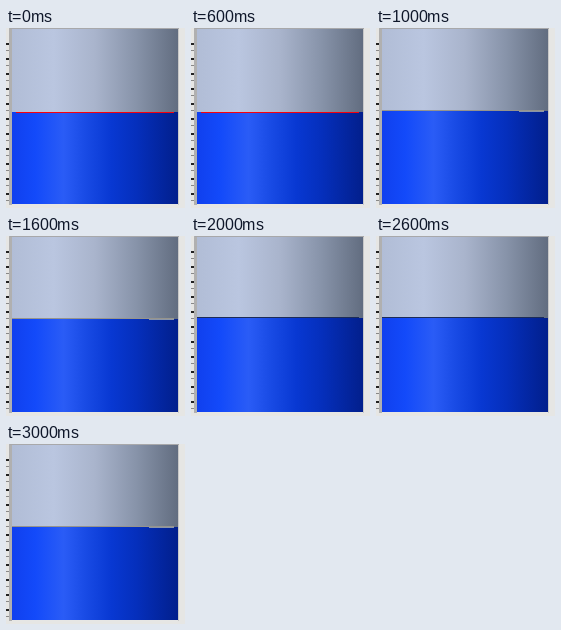
An HTML page for the animation above (4 s loop, 179 by 180 pixels).

```html
<!DOCTYPE html>
<html lang="en">
<head>
<meta charset="utf-8">
<title>Tank level</title>
<style>
  html, body { margin: 0; width: 100%; height: 100%; overflow: hidden; background: #e6e6e4; }
  svg { display: block; width: 100%; height: 100%; shape-rendering: crispEdges; }
</style>
</head>
<body>
<svg viewBox="0 0 179 180" preserveAspectRatio="none">
  <defs>
    <linearGradient id="gas">
      <stop offset="0" stop-color="#b1bdd6"/>
      <stop offset=".25" stop-color="#bac6e0"/>
      <stop offset=".5" stop-color="#a9b4cc"/>
      <stop offset=".75" stop-color="#8793a9"/>
      <stop offset="1" stop-color="#626d80"/>
    </linearGradient>
    <linearGradient id="liquid">
      <stop offset="0" stop-color="#1040ee"/>
      <stop offset=".14" stop-color="#134afa"/>
      <stop offset=".31" stop-color="#2a5cf6"/>
      <stop offset=".45" stop-color="#184ae4"/>
      <stop offset=".6" stop-color="#0838d2"/>
      <stop offset=".75" stop-color="#052fbc"/>
      <stop offset="1" stop-color="#021f8c"/>
    </linearGradient>
  </defs>
  <rect width="179" height="180" fill="#e6e6e4"/>
  <g id="scale"></g>
  <rect x="3" width="3" height="177" fill="#b0b0b0"/>
  <rect x="4" width="169" height="1" fill="#a8a8aa"/>
  <rect x="172" y="1" width="1" height="176" fill="#c8c8c8"/>
  <rect x="6" y="1" width="166" height="175" fill="url(#gas)"/>
  <rect id="fill" x="6" width="166" height="92" fill="url(#liquid)"/>
  <rect id="line" width="162" height="1"/>
  <rect id="glint" x="143" y="83" width="25" height="1" fill="#8a95aa"/>
</svg>
<script>
  const $ = id => document.getElementById(id);
  const NS = "http://www.w3.org/2000/svg";

  function set(el, attrs) {
    for (const k in attrs) el.setAttribute(k, attrs[k]);
  }

  function tick(y, width, height, fill) {
    const r = document.createElementNS(NS, "rect");
    set(r, { x: 0, y, width, height, fill });
    $("scale").append(r);
  }
  for (let y = 15; y < 177; y += 15) {
    tick(y, 3, 2, "#222");
    if (y + 7 < 177) tick(y + 7, 3, 1, "#888");
  }

  // One row per second: liquid top, surface line and its colour, glint shown
  const low = { top: 84, x: 10, line: 84, color: "#f8000c", glint: 0 };
  const mid = { top: 83, x: 6, line: 82, color: "#96948c", glint: 1 };
  const high = { top: 82, x: 6, line: 81, color: "#1c2c58", glint: 0 };
  const steps = [low, mid, high, mid];
  const STEP = 1000, BOTTOM = 176;
  const start = performance.now();

  function draw(now) {
    const t = Math.max(0, now - start);
    const s = steps[Math.floor(t / STEP) % steps.length];
    set($("fill"), { y: s.top, height: BOTTOM - s.top });
    set($("line"), { x: s.x, y: s.line, width: 168 - s.x, fill: s.color });
    set($("glint"), { opacity: s.glint });
    requestAnimationFrame(draw);
  }
  draw(start);
</script>
</body>
</html>
```
